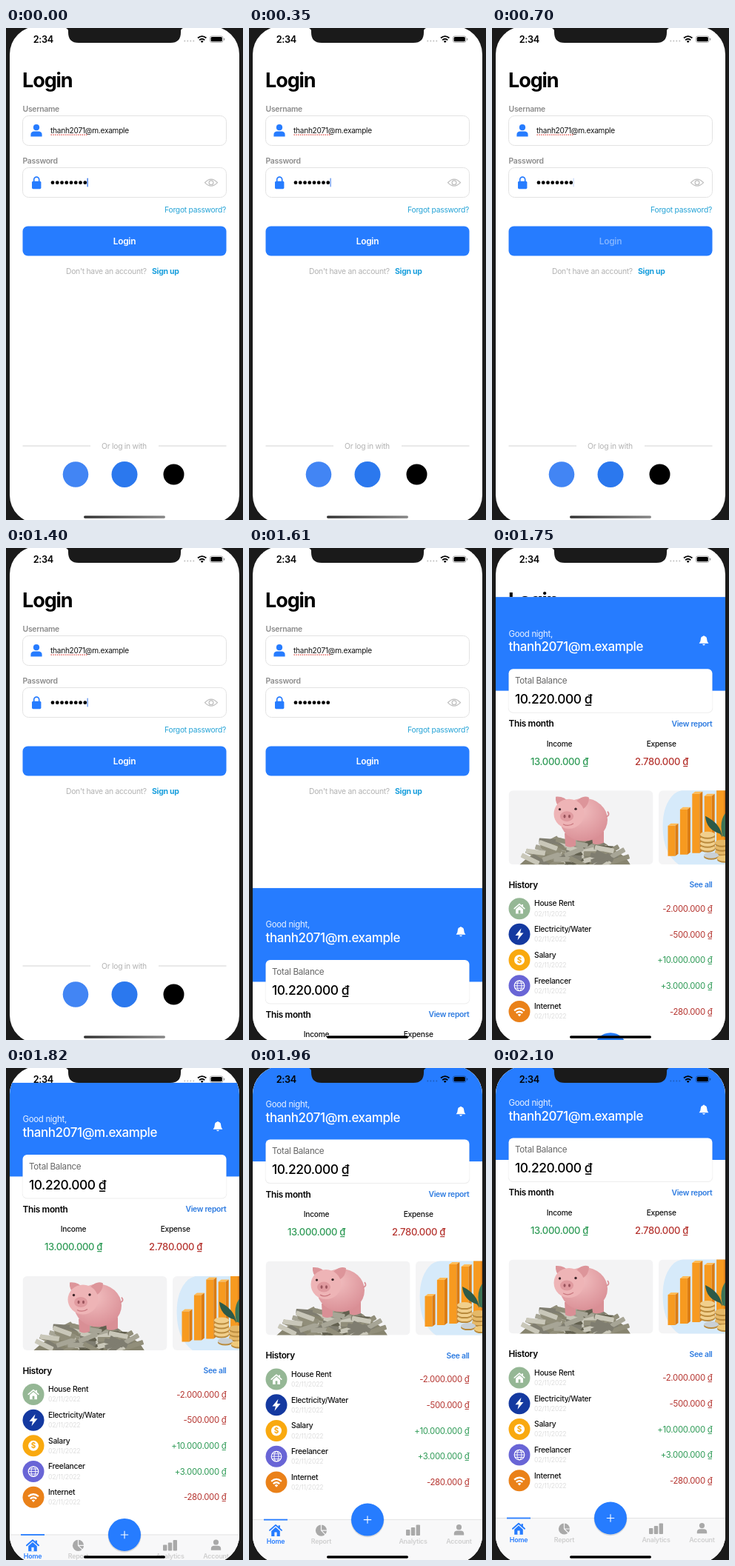
Recreate the animation shown at these times as an HTML page. Size 320 by 664 pixels, loop 2940 ms.

```html
<!DOCTYPE html>
<html lang="en">
<head>
<meta charset="utf-8">
<title>Login</title>
<style>
html, body { margin: 0; width: 100%; height: 100%; overflow: hidden; background: #1a1a1a; }
svg { display: block; width: 100vw; height: 100vh; }
text { font-family: Inter, Roboto, sans-serif; letter-spacing: -.025em; white-space: pre; }
</style>
</head>
<body>
<svg id="stage" viewBox="0 0 320 664"></svg>
<script>
const LOOP = 2940, STEP = 70;
const BLUE = '#267cff', GREEN = '#2f9b57', RED = '#b5342f', GRAY = '#a9a9a9';
const MAIL = ['thanh2071', '@m.example'];

const text = (x, y, str, size, weight, fill, anchor = 'start', extra = '') =>
  `<text x="${x}" y="${y}" font-size="${size}" font-weight="${weight}" fill="${fill}" text-anchor="${anchor}" ${extra}>${str}</text>`;
const rect = (x, y, w, h, r, fill, extra = '') =>
  `<rect x="${x}" y="${y}" width="${w}" height="${h}" rx="${r}" fill="${fill}" ${extra}/>`;
const dot = (x, y, r, fill, extra = '') =>
  `<circle cx="${x}" cy="${y}" r="${r}" fill="${fill}" ${extra}/>`;
const oval = (x, y, rx, ry, fill, extra = '') =>
  `<ellipse cx="${x}" cy="${y}" rx="${rx}" ry="${ry}" fill="${fill}" ${extra}/>`;
const path = (d, fill, extra = '') => `<path d="${d}" fill="${fill}" ${extra}/>`;
const line = (d, color, width, extra = '') =>
  path(d, 'none', `stroke="${color}" stroke-width="${width}" ${extra}`);
const group = (body, attrs) => `<g ${attrs}>${body}</g>`;
const times = (n, fn) => Array.from({ length: n }, (_, i) => fn(i)).join('');

let seed = 11;
const rand = () => (seed = seed * 16807 % 2147483647) / 2147483647;

const person = (x, y, s, fill) => group(
  dot(0, -4.6, 4.1, fill) + path('M-7.6 7.6V5.2Q-7.6 1 -2.6 .8H2.6Q7.6 1 7.6 5.2V7.6Z', fill),
  `transform="translate(${x} ${y}) scale(${s})"`);

const house = (x, y, s, fill, hole) => group(
  line('M-8 0L0 -7L8 0', fill, 1.9, 'stroke-linecap="round" stroke-linejoin="round"') +
  rect(3.6, -6.6, 2.3, 4, 0, fill) +
  path('M-5.8 1L0 -4.2L5.8 1V8H-5.8Z', fill) + rect(-1.6, 2.6, 3.2, 5.4, 0, hole),
  `transform="translate(${x} ${y}) scale(${s})"`);

const wifi = (x, y, s, fill) => group(
  line('M-6 -1.8Q0 -7 6 -1.8', fill, 2) + line('M-3.7 1Q0 -2.2 3.7 1', fill, 2) +
  path('M-2 2.8Q0 1 2 2.8L0 5Z', fill),
  `transform="translate(${x} ${y}) scale(${s})"`);

function loginPage() {
  const field = y => rect(22.5, y, 275, 40, 8, '#fff', 'stroke="#e2e2e2"');
  return rect(5, -3, 310, 672, 0, '#fff') +
    text(22, 80, 'Login', 27, 700, '#000', 'start', 'style="letter-spacing:-1.1px"') +
    text(22.5, 113, 'Username', 10.4, 600, '#8c8c8c') + field(118.5) +
    person(41, 138.8, 1, BLUE) +
    text(60, 142.3, MAIL.join(''), 10.1, 400, '#111') +
    line('M60.5 144.2H110.5', '#e0473f', 1.3, 'stroke-dasharray="1.5 1.3"') +
    text(22.5, 183, 'Password', 10.4, 600, '#8c8c8c') + field(188.5) +
    rect(35, 206.8, 12.4, 10.4, 1.6, BLUE) +
    line('M37.7 207V204.6A3.5 3.5 0 0 1 44.7 204.6V207', BLUE, 1.7) +
    times(8, i => dot(63 + i * 6.25, 208.7, 2.4, '#000')) +
    rect(109.4, 202.6, 1.5, 11.8, .6, '#4b82ea', 'id="caret"') +
    line('M268.5 208.7Q277 199.6 285.5 208.7Q277 217.8 268.5 208.7Z', '#bdbdbd', 1.2) +
    dot(277, 208.7, 2.9, 'none', 'stroke="#bdbdbd" stroke-width="1.2"') +
    text(297, 249, 'Forgot password?', 10.3, 400, '#25a3d6', 'end') +
    rect(22.5, 267.5, 275, 40, 7, BLUE) +
    text(160, 291.7, 'Login', 11.9, 600, '#fff', 'middle', 'id="press"') +
    text(81, 332, 'Don\'t have an account?', 10.3, 400, '#b2b2b2') +
    text(197, 332, 'Sign up', 10.5, 700, '#1a9fdd') +
    line('M22.5 564H114M206 564H297.5', '#d2d2d2', 1) +
    text(159.5, 567.8, 'Or log in with', 10.3, 400, '#b2b2b2', 'middle') +
    dot(94, 602.5, 17.3, '#4285f4') + dot(160, 602.5, 17.5, '#2b78ee') + dot(226.5, 602.5, 14, '#000') +
    rect(105, 658.3, 110, 3.4, 1.7, 'url(#bar)');
}

function pigPhoto() {
  const tones = ['#7f7d70', '#a7a596', '#c9c7b9', '#62604f', '#918e7a'];
  const bill = () => {
    const v = rand(), x = 112 + (rand() - .5) * (74 + v * 64), y = 327 + v * 29;
    return rect(-13, -3.2, 26, 6.4, 1, tones[Math.floor(rand() * 5)],
      `transform="translate(${x.toFixed(1)} ${y.toFixed(1)}) rotate(${Math.round(rand() * 70 - 35)})"`);
  };
  return group(
    rect(22.5, 258.5, 195, 100, 0, '#f3f3f4') +
    path('M37 359Q52 344 70 338Q84 323 118 323Q152 323 160 337Q180 345 187 359Z', '#87846f') +
    times(65, bill) +
    path('M98 316H113V333Q105 337 99 333ZM134 314H151V329Q142 333 136 330Z', '#d98f95') +
    oval(124, 298, 32, 29, 'url(#pig)') +
    path('M86 267Q98 266 104 275L92 282Q85 276 86 267ZM114 273Q123 264 131 268Q131 279 122 284Z', '#dd959a') +
    oval(104, 290, 20.5, 20, '#eeb4b6') +
    oval(101, 293.5, 9, 7, '#e09a9f') + oval(98, 293.5, 1.5, 2.3, '#9a545c') + oval(104.5, 293.5, 1.5, 2.3, '#9a545c') +
    dot(91.5, 284, 1.7, '#3c2529') + dot(113, 283.5, 1.7, '#3c2529') +
    line('M96 304Q103 308 110 303', '#c9787f', 1.2) +
    line('M154 294Q160 292 156 287', '#d98f95', 1.8),
    'clip-path="url(#photoA)"');
}

function chartPhoto() {
  const tops = [306, 284, 263, 266, 257];
  const bar = i => {
    const x = 237.5 + i * 16.4, y = tops[i], b = 347 - i * 2;
    return path(`M${x} ${y}l4 -3h10l-4 3z`, '#ffbc58') +
      path(`M${x} ${y}h10V${b}h-10z`, '#f79a20') +
      path(`M${x + 10} ${y}l4 -3V${b - 3}l-4 3z`, '#dc7c12');
  };
  const coin = (x, y, c) => oval(x, y + 2, 10, 4, '#b98a3c') + oval(x, y, 10, 4, c);
  return group(
    rect(225, 258.5, 195, 100, 0, '#f4f4f5') +
    path('M231 316Q228 280 246 263Q255 256 280 256H330V360H254Q233 346 231 316Z', '#d6eafa') +
    times(5, bar) +
    path('M311 322Q309 303 288 293Q289 311 308 317Z', '#2d5a48') +
    path('M311 320Q306 298 317 287V322Z', '#3d7458') +
    times(4, i => coin(291, 336 - i * 6, '#f1cf8c')) +
    times(3, i => coin(311, 341 - i * 6, '#e5b867')) +
    coin(296, 346, '#c9d0d5') + coin(314, 350, '#efc979'),
    'clip-path="url(#photoB)"');
}

const icons = [
  house(37, 0, .85, '#fff', '#95b795'),
  path('M39.5 -8L31.5 1.6H36L34.5 8L42.5 -1.8H38Z', '#fff'),
  dot(37, 0, 7, '#fff') + text(37, 3.6, '$', 10, 700, '#f9a90f', 'middle'),
  dot(37, 0, 6.8, 'none', 'stroke="#fff" stroke-width="1.2"') +
    oval(37, 0, 3, 6.8, 'none', 'stroke="#fff"') +
    line('M30.2 0H43.8M31.2 -3.4H42.8M31.2 3.4H42.8', '#fff', .9),
  wifi(37, 1, 1.15, '#fff')
];
const rows = [
  ['House Rent', '-2.000.000', '#95b795'],
  ['Electricity/Water', '-500.000', '#1439a0'],
  ['Salary', '+10.000.000', '#f9a90f'],
  ['Freelancer', '+3.000.000', '#6965d6'],
  ['Internet', '-280.000', '#ea8119']
];

const historyRow = ([name, sum, color], i) => group(
  dot(37, 0, 14.5, color) + icons[i] +
  text(57, -3.2, name, 10.3, 500, '#111') +
  text(57, 10, '02/11/2022', 8.7, 400, '#dedede') +
  text(297.5, 4.2, sum + ' ₫', 11.4, 400, sum[0] === '+' ? GREEN : RED, 'end'),
  `transform="translate(0 ${418 + i * 34.7})"`);

function tabBar() {
  const label = (x, s, c) => text(x, 640, s, 8.9, 600, c, 'middle');
  return rect(5, 607.5, 310, 62, 0, '#f8f8f9') + line('M5 607.5H315', '#dcdcde', .8) +
    rect(20, 606.6, 32, 1.8, 0, BLUE) +
    house(36, 621.8, 1, BLUE, '#f8f8f9') + label(36, 'Home', BLUE) +
    dot(97.5, 622, 7.6, GRAY) + line('M97.5 614V622L103.5 628M97.5 622H106', '#f8f8f9', 1.2) +
    label(97.5, 'Report', '#cfcfcf') +
    rect(212, 621, 5.4, 8, 1, GRAY) + rect(218.8, 618, 5.4, 11, 1, GRAY) + rect(225.6, 614.5, 5.4, 14.5, 1, GRAY) +
    label(221.5, 'Analytics', '#cfcfcf') +
    person(283.5, 621.6, .88, GRAY) + label(283.5, 'Account', '#cfcfcf') +
    dot(160, 608.6, 22.6, '#000', 'opacity=".12"') + dot(160, 607.5, 22, BLUE) +
    line('M154.8 607.5H165.2M160 602.3V612.7', '#fff', 1.1);
}

function homePage() {
  return rect(5, -2.5, 310, 672, 0, '#fff') + rect(5, -2.5, 310, 126.5, 0, BLUE) +
    text(22.5, 51, 'Good night,', 11.4, 400, '#eaf2ff') +
    text(22.5, 70.8, MAIL.join(''), 17, 500, '#fff') +
    path('M279.6 60.2Q281.8 58 281.8 54.5Q282 51 285 50.4Q286 48.8 287 50.4Q290 51 290.2 54.5Q290.2 58 292.4 60.2Z', '#fff') +
    path('M284 61.2H288Q286 64.4 284 61.2Z', '#fff') +
    rect(21.8, 95, 276.4, 59, 6.5, '#000', 'opacity=".07"') + rect(22.5, 94.5, 275, 58.5, 6, '#fff') +
    text(31, 114.3, 'Total Balance', 11.7, 400, '#666') +
    text(31, 141.2, '10.220.000 ₫', 17.4, 500, '#000') +
    text(22.5, 172.4, 'This month', 11.8, 600, '#000') +
    text(297.5, 172, 'View report', 10.3, 600, '#2d7be0', 'end') +
    text(91, 199, 'Income', 10.2, 500, '#111', 'middle') +
    text(228.7, 199, 'Expense', 10.2, 500, '#111', 'middle') +
    text(91, 224, '13.000.000 ₫', 13, 500, GREEN, 'middle') +
    text(229, 224, '2.780.000 ₫', 13, 500, RED, 'middle') +
    pigPhoto() + chartPhoto() +
    text(22.5, 390.2, 'History', 11.8, 600, '#000') +
    text(297.5, 389.8, 'See all', 10.3, 600, '#2d7be0', 'end') +
    rows.map(historyRow).join('') + tabBar();
}

const statusBar =
  path('M77 -1Q84 0 84 4V6Q84 20 98 20H222Q236 20 236 6V4Q236 0 243 -1Z', '#1a1a1a') +
  text(50.3, 19.6, '2:34', 12.7, 600, '#000', 'middle') +
  times(4, i => dot(241.3 + i * 4, 17.6, 1, '#000', 'opacity=".25"')) +
  wifi(264.7, 15.3, .95, '#000') +
  rect(275.4, 10.9, 17.6, 8.6, 2.6, 'none', 'stroke="#000" stroke-opacity=".4" stroke-width=".8"') +
  rect(276.6, 12.1, 15.2, 6.2, 1.5, '#000') + rect(294, 13.7, 1.2, 3, .6, '#000', 'opacity=".4"');

const stage = document.getElementById('stage');
stage.innerHTML = `<defs>
  <clipPath id="screen">${rect(5, -2.5, 310, 671, 38, '#fff')}</clipPath>
  <clipPath id="photoA">${rect(22.5, 258.5, 195, 100, 6, '#fff')}</clipPath>
  <clipPath id="photoB">${rect(225, 258.5, 195, 100, 6, '#fff')}</clipPath>
  <linearGradient id="bar"><stop stop-color="#333"/><stop offset="1" stop-color="#888"/></linearGradient>
  <radialGradient id="pig" cx=".4" cy=".3" r=".75"><stop stop-color="#f2bfc0"/><stop offset="1" stop-color="#d98e95"/></radialGradient>
</defs>` +
  rect(0, 0, 320, 664, 0, '#1a1a1a') +
  group(loginPage() + group(homePage(), 'id="home"') +
    rect(105, 658.3, 110, 3.4, 1.7, '#000', 'id="grip"') + statusBar, 'clip-path="url(#screen)"');

const [caret, press, home, grip] = ['caret', 'press', 'home', 'grip'].map(id => document.getElementById(id));
const clamp = v => Math.max(0, Math.min(1, v));

function caretAlpha(t) {
  if (t < 630) return clamp((560 - t) / 280);
  return Math.min(clamp((t - 630) / 280), clamp((1610 - t) / 280));
}

// Critically damped spring: share of the way still to go.
function spring(t) {
  const u = Math.max(0, t - 1552) * .0195;
  return (1 + u) * Math.exp(-u);
}

function draw(t) {
  caret.setAttribute('opacity', caretAlpha(t));
  press.setAttribute('opacity', t < 700 ? 1 : clamp(.42 + .58 * (t - 700) / 350));
  const y = t >= 2100 ? 0 : 671 * spring(t);
  home.setAttribute('transform', `translate(0 ${y.toFixed(2)})`);
  home.style.display = grip.style.display = t > 1552 ? '' : 'none';
}

const start = performance.now();
function tick() {
  const t = (performance.now() - start) % LOOP;
  draw(Math.floor(t / STEP) * STEP);
  requestAnimationFrame(tick);
}
draw(0);
requestAnimationFrame(tick);
</script>
</body>
</html>
```
